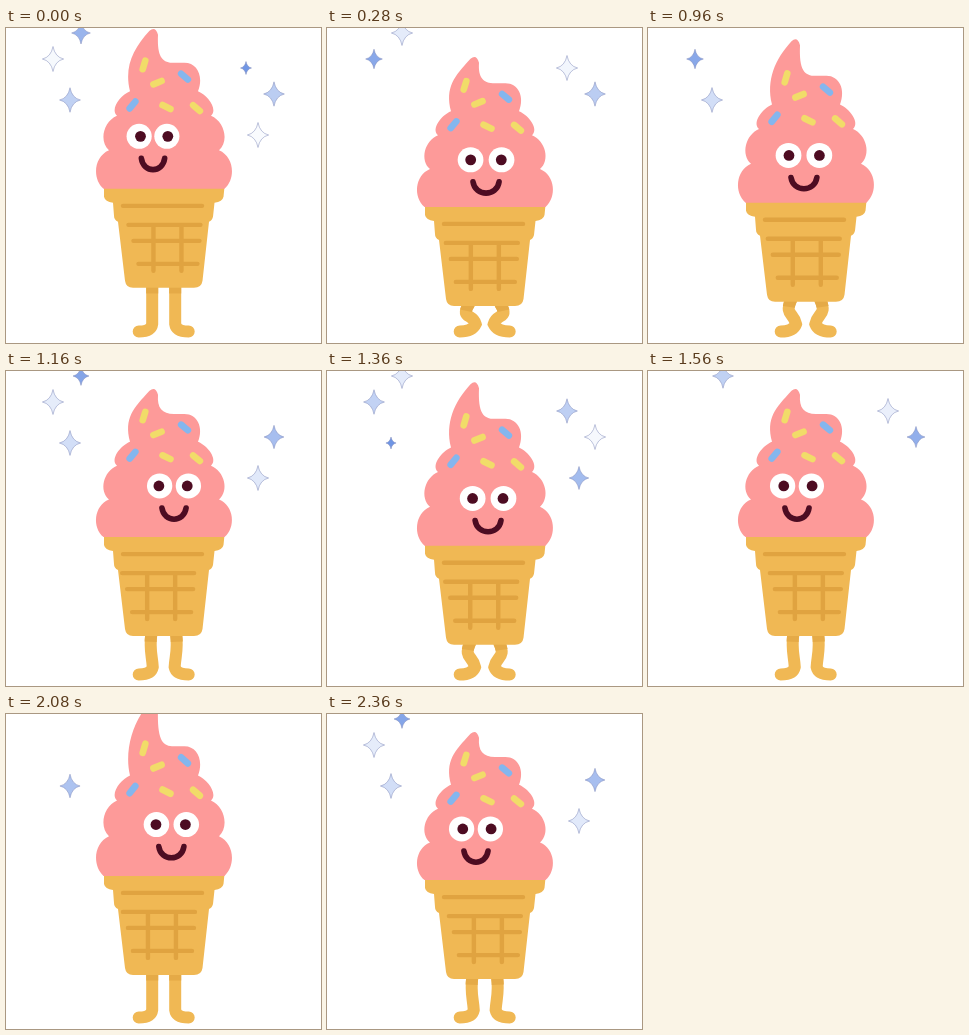
An HTML page that plays this animation: 315 px wide and 315 px high, repeating every 2.4 s.

```html
<!DOCTYPE html>
<html lang="en">
<head>
<meta charset="utf-8">
<title>Dancing ice cream</title>
<style>
  html, body { margin: 0; width: 100%; height: 100%; overflow: hidden; background: #fff; }
  svg { display: block; width: 100vw; height: 100vh; }
</style>
</head>
<body>
<svg viewBox="0 0 315 315">
  <g id="stars" stroke="#7f88b8" stroke-width=".5" stroke-linejoin="round"></g>
  <g fill="none" stroke="#f0b854" stroke-width="12" stroke-linecap="round">
    <path id="legL"/>
    <path id="legR"/>
    <g stroke="#e5aa47" stroke-linecap="butt" stroke-dasharray="8 300">
      <path id="shadeL"/>
      <path id="shadeR"/>
    </g>
  </g>
  <g id="cone">
    <path fill="#f0b854" d="M98 -2H218.500L217.500 8Q216.500 13 208.500 14L207 28Q206 32 203 33L196.500 92Q195.500 99 188 99H127Q120 99 119 92L112 33Q108 31 108 27L107 14Q99 13 98 8Z"/>
    <g fill="none" stroke="#e0a340" stroke-width="4.400" stroke-linecap="round">
      <path d="M117 17H196"/>
      <path id="grid" d="M119 36H191M124 52H190M129 75H188M144 37V82M172 37V82"/>
    </g>
  </g>
  <path id="cream" fill="#fd9a99"/>
  <g id="sprinkles" fill="none" stroke-width="6.600" stroke-linecap="round"></g>
  <g id="face">
    <ellipse id="eyeL" ry="12.500" fill="#fff"/>
    <ellipse id="eyeR" ry="12.500" fill="#fff"/>
    <circle id="pupilL" r="5.400" fill="#4d0c22"/>
    <circle id="pupilR" r="5.400" fill="#4d0c22"/>
    <path id="mouth" fill="none" stroke="#4d0c22" stroke-width="5.600" stroke-linecap="round"/>
  </g>
</svg>
<script>
const LOOP = 2400, STEP = 40, BEAT = 400, TWINKLE = LOOP / 2, MID = 158;
const YELLOW = "#f1dc69", BLUE = "#84b6ee";
const $ = id => document.getElementById(id);
const set = (el, attrs) => { for (const k in attrs) el.setAttribute(k, attrs[k]); };
const cos = (t, period) => Math.cos(t / period * 2 * Math.PI);
const sin = (t, period) => Math.sin(t / period * 2 * Math.PI);

function add(parent, attrs) {
  const el = document.createElementNS("http://www.w3.org/2000/svg", "path");
  set(el, attrs);
  $(parent).append(el);
  return el;
}

// The bounce repeats every beat, the look from side to side every two beats
const rimY = t => 170.4 - 11.2 * cos(t - 35, BEAT);
const tipLength = t => 160 + 13 * sin(t, BEAT) + 4.3 * sin(t, BEAT / 2);
const eyeHeight = t => 49.2 + 3.5 * cos(t - 22, BEAT);
const look = t => -8.8 * cos(t - 32, 2 * BEAT) - 3 * cos(t + 6, 2 * BEAT / 3);

// x, y, brightest moment, half of its life
const stars = [
  [47, 31, 20, 330], [75, 5, 220, 320], [64, 72, 1060, 320],
  [240, 40, 310, 335], [268, 66, 140, 300], [252, 107, 1210, 240]
].map(([x, y, peak, half]) =>
  ({ el: add("stars", { transform: `translate(${x} ${y})` }), peak, half }));

// x, height above the rim, tilt, colour
for (const [x, up, tilt, color] of [
  [138, 122, 107, YELLOW], [151.5, 104.5, -22, YELLOW], [178.5, 110.5, 40, BLUE],
  [126.5, 82.5, -50, BLUE], [160.5, 80.5, 26, YELLOW], [190.5, 79.5, 40, YELLOW]
]) add("sprinkles", { d: "M-4.400 0H4.400", stroke: color, transform: `translate(${x} ${-up}) rotate(${tilt})` });

function drawStar({ el, peak, half }, t) {
  const d = (t - peak + 1.5 * TWINKLE) % TWINKLE - TWINKLE / 2;
  const u = Math.min(1, Math.abs(d) / half);
  const h = 12.5 * Math.sqrt(1 - u ** 4), w = h * 0.85, c = h * 0.16;
  const pale = (1 - u) ** 0.9;
  const mix = (a, b) => Math.round(a + (b - a) * pale);
  set(el, {
    visibility: u < 1 ? "visible" : "hidden",
    fill: `rgb(${mix(98, 255)},${mix(140, 255)},${mix(226, 255)})`,
    d: `M0 ${-h}Q${c} ${-c} ${w} 0Q${c} ${c} 0 ${h}Q${-c} ${c} ${-w} 0Q${-c} ${-c} 0 ${-h}Z`
  });
}

// Three scalloped tiers on each side, a swirl on top
const tiers = [[60.5, 0], [55, 38], [47, 72], [34, 96]];

function lobe(side, y, [w0, h0], [w1, h1]) {
  const dh = h1 - h0, out = 0.3 * Math.abs(dh);
  const low = dh > 0 ? [w0 + out, h0 + dh * 0.26] : [w0 + out * 1.35, h0 + dh * 0.17];
  const high = dh > 0 ? [w1 + out * 1.35, h1 - dh * 0.17] : [w1 + out, h1 - dh * 0.26];
  return "C" + [low, high, [w1, h1]].map(([w, h]) => `${MID + side * w} ${y(h)}`).join(" ");
}

function creamPath(rim, tip, k) {
  const y = h => rim - h * k;
  let d = `M${MID - tiers[0][0]} ${rim}`;
  for (let i = 0; i < 3; i++) d += lobe(-1, y, tiers[i], tiers[i + 1]);
  d += `C118 ${y(120)} 127 ${tip + 20} 143.500 ${tip + 2}Q149.500 ${tip - 3} 152 ${tip + 6}`
    + `C151 ${y(130)} 156 ${y(124)} 168 ${y(124)}H177C191 ${y(125)} 198 ${y(111)} 192 ${y(96)}`;
  for (let i = 3; i > 0; i--) d += lobe(1, y, tiers[i], tiers[i - 1]);
  return d + "Z";
}

function legPath(base, side) {
  const bend = Math.max(0, (base - 262) / 13);
  const x = (v, b = 0) => 157.7 + side * (v - b * bend);
  return `M${x(11.5, -3)} ${base - 3}C${x(11.5, -11)} ${base + 13} ${x(11.5, 0)} 285 ${x(11.5, 2)} 296`
    + `Q${x(12.5)} 303.500 ${x(25)} 303.500`;
}

function draw(t) {
  const rim = rimY(t), length = tipLength(t), gaze = look(t);
  const k = 1 + (length - 152) * 0.002;
  stars.forEach(star => drawStar(star, t));

  for (const [name, side] of [["L", -1], ["R", 1]]) {
    const d = legPath(rim + 99.5, side);
    set($("leg" + name), { d });
    set($("shade" + name), { d });
  }
  set($("cone"), { transform: `translate(0 ${rim})` });
  set($("grid"), { transform: `translate(${-gaze * 0.3} 0)` });
  set($("cream"), { d: creamPath(rim, rim - length, k) });
  set($("sprinkles"), { transform: `translate(0 ${rim}) scale(1 ${k})` });

  const gap = 31 - 3 * (gaze / 11) ** 2, half = gap / 2, w = gap * 0.42;
  set($("face"), { transform: `translate(${158.5 + gaze} ${rim - eyeHeight(t)})` });
  for (const [name, side] of [["L", -1], ["R", 1]]) {
    set($("eye" + name), { cx: side * half, rx: gap * 0.1 + 9.8 });
    set($("pupil" + name), { cx: side * (half - 0.2) - gaze * 0.1 });
  }
  set($("mouth"), { d: `M${-w} 22C${2 - w} 37 ${w - 2} 37 ${w} 22` });
}

const start = performance.now();
function tick() {
  const t = (performance.now() - start) % LOOP;
  draw(Math.floor(t / STEP) * STEP);
  requestAnimationFrame(tick);
}
tick();
</script>
</body>
</html>
```
